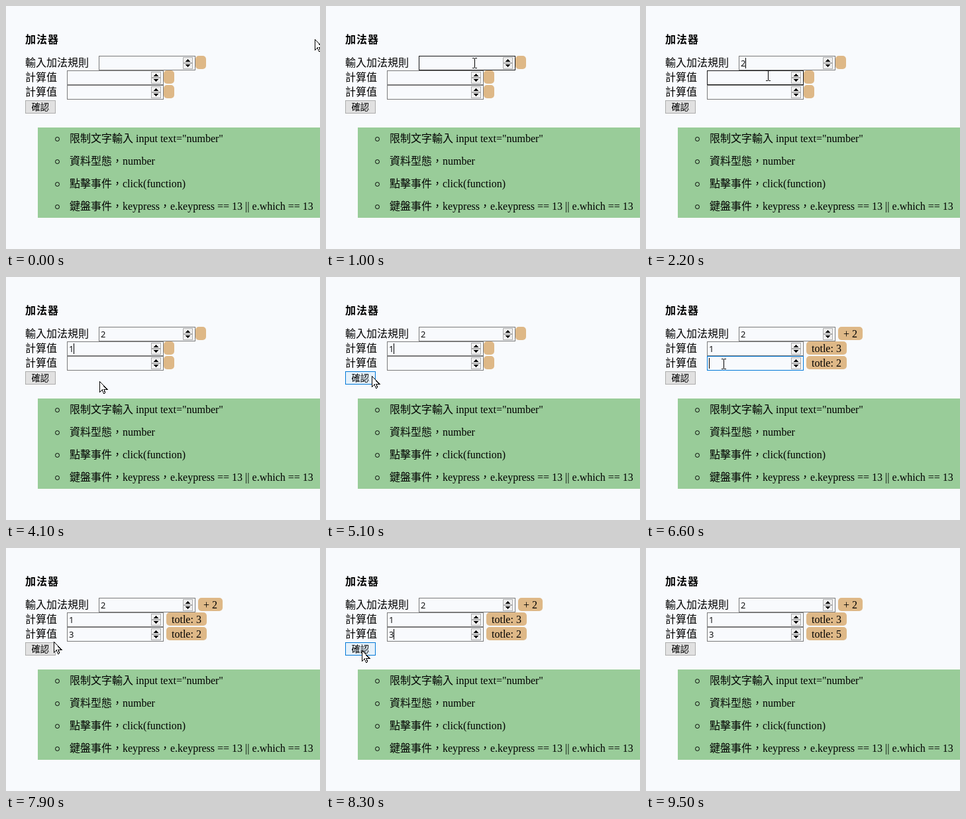
Write an HTML page that moves like this. It is 474 by 366 pixels and loops after 9600 ms.

```html
<!DOCTYPE html>
<html lang="zh-Hant">
<head>
<meta charset="utf-8">
<title>加法器</title>
<style>
html, body { margin: 0; width: 100%; height: 100%; overflow: hidden; background: #f8fafd; }
svg { display: block; }
text { font: 16px "Liberation Serif", "Noto Sans CJK TC", "Noto Sans CJK", serif; fill: #000; }
.title { font-weight: 700; letter-spacing: 1px; }
.value { font: 13px "Open Sans", "Noto Sans", sans-serif; }
.label { font: 13.333px "Noto Sans CJK TC", "Noto Sans CJK", sans-serif; }
rect, path { shape-rendering: crispEdges; }
.badge { fill: #deb887; shape-rendering: auto; }
</style>
</head>
<body>
<svg id="stage" width="474" height="366" viewBox="0 0 474 366"></svg>
<script>
const LOOP = 9600, STEP = 100, BLINK = 500;
const CLICKS = [5500, 8400], BLUR = 9500;
const stage = document.getElementById('stage');

function set(el, attrs) {
  for (const key in attrs) el.setAttribute(key, attrs[key]);
}
function add(tag, attrs, content) {
  const el = document.createElementNS('http://www.w3.org/2000/svg', tag);
  set(el, attrs);
  if (content) el.textContent = content;
  stage.appendChild(el);
  return el;
}
const text = (x, y, content, cls = '') => add('text', { x, y, class: cls }, content);
const show = (el, on) => el.setAttribute('visibility', on ? 'visible' : 'hidden');
const within = (v, from, size) => v >= from && v < from + size;

// Static page
text(29, 56, '加法器', 'title');
add('rect', { x: 48, y: 183, width: 426, height: 136, fill: '#99cc99' });
[
  '限制文字輸入 input text="number"',
  '資料型態，number',
  '點擊事件，click(function)',
  '鍵盤事件，keypress，e.keypress == 13 || e.which == 13'
].forEach((line, i) => {
  add('circle', { cx: 77.5, cy: 200.5 + i * 34, r: 3, fill: 'none', stroke: '#000' });
  text(96, 205 + i * 34, line);
});

// Each field is pressed, typed into, then left for the next control
const fields = [
  { x: 140, label: '輸入加法規則', digit: 2, press: 500, typed: 1500, leave: 2300 },
  { x: 92, label: '計算值', digit: 1, press: 2300, typed: 3100, leave: CLICKS[0] },
  { x: 92, label: '計算值', digit: 3, press: 6600, typed: 7400, leave: CLICKS[1] }
];

function spinner(x, y) {
  for (const dy of [2.5, 11.5]) {
    add('rect', { x: x + .5, y: y + dy, width: 14, height: 8, fill: '#f0f0f0', stroke: '#acacac' });
  }
  add('path', { d: `M${x + 4} ${y + 9}h7l-3.5-4zM${x + 4} ${y + 13}h7l-3.5 4z` });
}

fields.forEach((f, i) => {
  f.y = 75 + 22 * i;
  const base = f.y + 16;
  text(29, base, f.label);
  f.box = add('rect', { x: f.x + .5, y: f.y + .5, width: 145, height: 21, fill: '#f8fafd' });
  spinner(f.x + 127, f.y);
  f.value = text(f.x + 3, base, f.digit, 'value');
  f.badge = add('rect', { y: f.y, height: 20, rx: 5, class: 'badge' });
  f.result = text(f.x + 158, base, '');
});

const button = add('rect', {});
text(38.5, 157, '確認', 'label');
const caret = add('rect', { width: 1, height: 16 });

const arrow = add('path', {
  d: 'M.5 .5V16.5L4.2 12.9L6.7 18.5L8.9 17.6L6.5 12H11.5Z', fill: '#fff', stroke: '#000'
});
const beam = add('path', {
  d: 'M-3-7.5h3m1 0h3M.5-7V7M-3 7.5h3m1 0h3', fill: 'none', stroke: '#000'
});

// Pointer moves: start, duration, x, y
const home = [466, 50];
const moves = [
  [0, 300, 254, 110], [300, 100, 186, 105], [400, 100, 224, 86], [1800, 400, 184, 105],
  [3600, 500, 141, 157], [4100, 1000, 69, 149], [5100, 400, 57, 151],
  [5800, 400, 117, 131], [7800, 200, 27, 150], [8000, 300, 54, 154], [8700, 400, 505, 124]
];

function pointerAt(t) {
  let [x, y] = home;
  for (const [start, span, toX, toY] of moves) {
    const k = Math.min(1, Math.max(0, (t - start) / span));
    const ease = k * k * (3 - 2 * k);
    x += (toX - x) * ease;
    y += (toY - y) * ease;
  }
  return [Math.round(x), Math.round(y)];
}

// Sum shown in a badge, using the values present at the last finished click
function resultOf(i, t) {
  const click = CLICKS.filter(c => t >= c + STEP).pop();
  if (!click) return '';
  const valueOf = f => click >= f.typed ? f.digit : 0;
  const rule = valueOf(fields[0]);
  return i ? `totle: ${rule + valueOf(fields[i])}` : `+ ${rule}`;
}

function drawField(f, i, t, hover) {
  const pressed = within(t, f.press, STEP);
  f.box.setAttribute('stroke', pressed ? '#0078d7' : hover ? '#171717' : '#7a7a7a');
  show(f.value, t >= f.typed);
  const result = resultOf(i, t);
  const width = !result ? 16 : i ? 61 : 37;
  set(f.badge, { x: f.x + (result ? 150 : 146), width });
  f.result.textContent = result;
}

function drawButton(t, hover) {
  const pressed = CLICKS.some(c => within(t, c, STEP));
  const focused = within(t, CLICKS[0], fields[2].press - CLICKS[0]) ||
    within(t, CLICKS[1], BLUR - CLICKS[1]);
  const line = focused && !pressed ? 2 : 1;
  set(button, {
    x: 29 + line / 2, y: 142 + line / 2, width: 46 - line, height: 20 - line,
    'stroke-width': line,
    fill: pressed ? '#cce4f7' : hover ? '#e5f1fb' : '#e1e1e1',
    stroke: pressed ? '#005499' : hover || focused ? '#0078d7' : '#adadad'
  });
}

// Typing moves the caret on and flips its blink phase
function drawCaret(t) {
  const f = fields.find(f => t >= f.press && t < f.leave);
  if (!f) return show(caret, false);
  const typed = t >= f.typed;
  const odd = Math.floor((t - f.press) / BLINK) % 2 === 1;
  show(caret, odd === typed);
  set(caret, { x: f.x + (typed ? 10 : 3), y: f.y + 3 });
}

function draw(time) {
  const t = Math.floor(time % LOOP / STEP) * STEP;
  const [px, py] = pointerAt(t);
  const over = (x, y, w, h) => within(px, x, w) && within(py, y, h);
  const hovered = fields.find(f => over(f.x, f.y, 146, 22));

  fields.forEach((f, i) => drawField(f, i, t, f === hovered));
  drawButton(t, over(29, 142, 46, 20));
  drawCaret(t);

  show(arrow, !hovered);
  show(beam, hovered);
  set(hovered ? beam : arrow, { transform: `translate(${px} ${py})` });
}

const start = performance.now();
function tick() {
  draw(performance.now() - start);
  requestAnimationFrame(tick);
}
tick();
</script>
</body>
</html>
```
